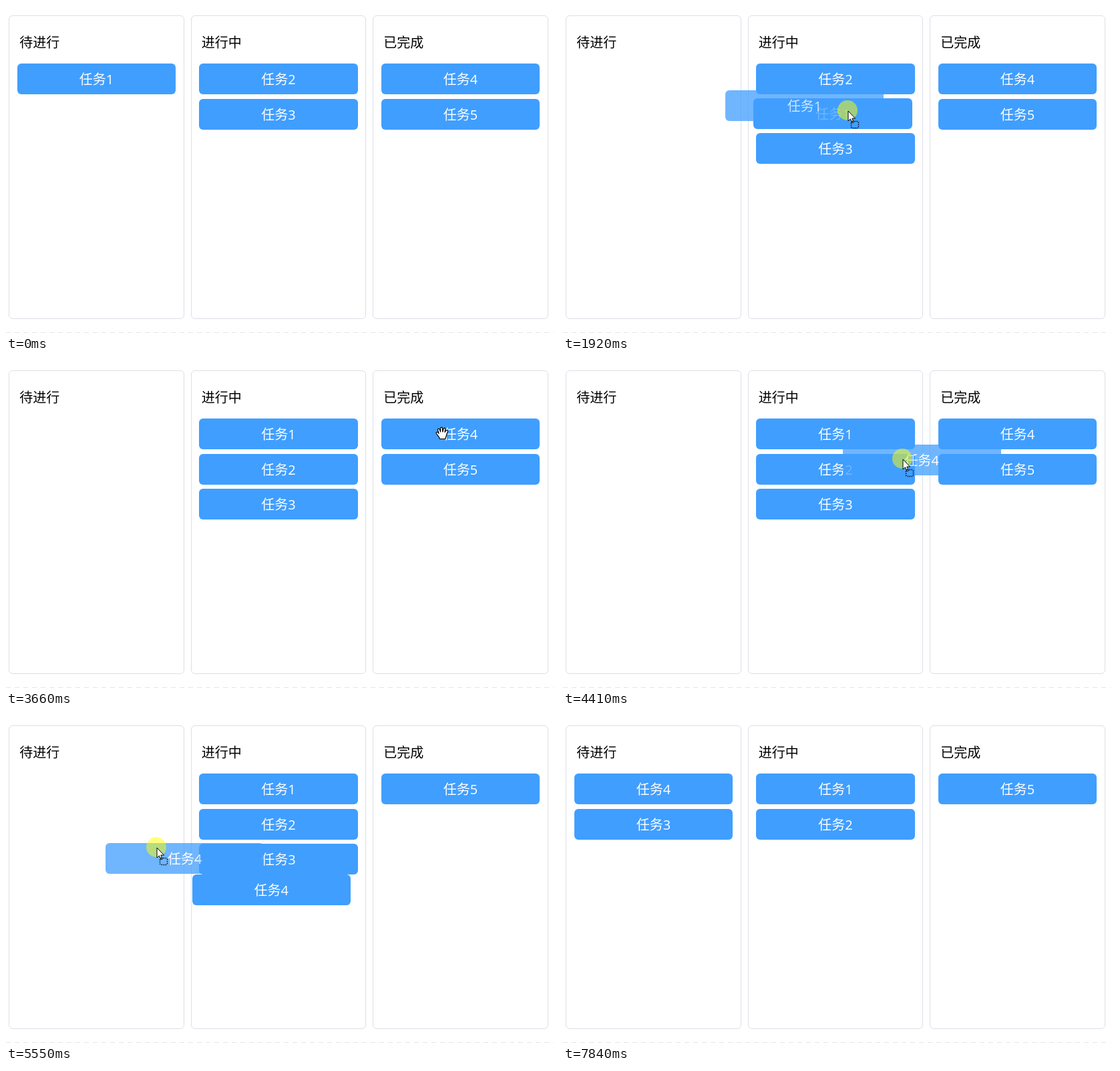
Recreate the animation shown at these times as an HTML page. Size 825 by 489 pixels, loop 8640 ms.

```html
<!DOCTYPE html>
<html lang="zh">
<head>
<meta charset="utf-8">
<style>
  html, body { margin: 0; width: 100%; height: 100%; overflow: hidden; background: #fff; }
  body { position: relative; font: 20px "Open Sans", "Noto Sans CJK SC", "Noto Sans CJK", sans-serif; }
  body > * { position: absolute; box-sizing: border-box; }
  .col { top: 14px; width: 262.5px; height: 454px; padding: 17px 15px; border: 1px solid #dcdfe6; border-radius: 6px; line-height: 46px; }
  .card { width: 237.3px; height: 46px; border-radius: 6px; background: #409eff; color: #fff; line-height: 48px; text-align: center; }
  #ghost { opacity: .75; }
  #rule { left: 0; top: 488px; width: 820px; height: 1px; background: repeating-linear-gradient(90deg, #e2e5e9 0 7px, #fff 7px 13px); }
  svg { left: 0; top: 0; overflow: visible; }
</style>
</head>
<body>
<div id="rule"></div>
<svg id="cursor" width="1" height="1" stroke="#000" fill="#fff" stroke-linejoin="round">
  <circle id="press" r="15" fill="#ff0" fill-opacity=".5" stroke="none"/>
  <path id="hand" stroke-width="1.2" d="M-3.5 8.5C-4 5-8.5 2-9-.5C-8.5-2.5-6-1.5-5 .5L-6.5-5C-6.5-7.5-4-7.5-3.5-5L-2.5-2V-7C-2-9.5 .5-9.5 .5-7L.8-2L2-6.5C3-8.8 5-8 4.7-6L4-1.5L6-4C7.5-5.5 9.3-4 8.3-2C6.5 1.5 6.5 5 4.5 8.5Z"/>
  <path id="arrow" d="M1 1V16l3.4-3.1 2.6 6 2.4-1-2.6-5.8h4.7z"/>
  <rect id="badge" x="5.5" y="16.5" width="11" height="10" rx="2" fill="none" stroke-width="1.4" stroke-dasharray="1.5 1.5"/>
</svg>
<script>
const LOOP = 8640, STEP = 70, SLIDE = 300;

// Pointer moves: start, end, then the points of a line or a quadratic curve
const moves = [
  [260, 1170, [562, 418], [198, 116]],
  [1570, 2060, [198, 116], [468, 163]],
  [2320, 2950, [468, 163], [445, 36], [431, 133]],
  [3170, 3660, [431, 133], [560, 80], [652.5, 107.5]],
  [4130, 4740, [652.5, 107.5], [410, 172]],
  [4740, 5550, [410, 172], [425, 400], [225, 196]],
  [5550, 6020, [225, 196], [160, 150], [190, 177]],
  [6350, 6630, [294, 208], [384, 211]],
  [6890, 7370, [384, 211], [179, 186]],
  [7700, 7840, [330, 296], [667, 555]],
];

// Button down, drag start, drop, task, ghost offset from the pointer
const drags = [
  [1370, 1570, 2060, 1, -183, -30],
  [2320, 2390, 2950, 1, -179, -24],
  [3930, 4130, 4800, 4, -89, -21],
  [4800, 4800, 5880, 4, -76, -6],
  [6630, 6890, 7370, 3, -95, -20],
];

// Time, task, new column, new row
const shifts = [[1694, 1, 1, 1], [2530, 1, 1, 0], [4430, 4, 1, 1], [4800, 4, 1, 2],
  [4920, 4, 1, 3], [5546, 4, 0, 0], [7060, 3, 0, 1]];

const boards = [{ at: 0, cols: [[1], [2, 3], [4, 5]] }];
for (const [at, task, col, row] of shifts) {
  const cols = boards.at(-1).cols.map(c => c.filter(n => n !== task));
  cols[col].splice(row, 0, task);
  boards.push({ at, cols });
}

const $ = id => document.getElementById(id);
const cursor = $('cursor');
const show = (el, on) => el.style.display = on ? '' : 'none';
const place = (el, [x, y]) => { el.style.left = x + 'px'; el.style.top = y + 'px'; };
const mix = (a, b, p) => a.map((v, i) => v + (b[i] - v) * p);
const easeOut = (p, power) => 1 - (1 - Math.min(1, p)) ** power;

function add(cls, text) {
  const el = document.createElement('div');
  el.className = cls;
  el.textContent = text;
  document.body.insertBefore(el, cursor);
  return el;
}

['待进行', '进行中', '已完成'].forEach((name, i) => { add('col', name).style.left = 4.2 + 272.5 * i + 'px'; });
const cards = [1, 2, 3, 4, 5].map(n => add('card', '任务' + n));
const ghost = add('card', '');
ghost.id = 'ghost';

const moveAt = t => moves.findLast(m => m[0] <= t) || moves[0];

// The picture advances in steps while the pointer moves
function stepped(t) {
  const [start, end] = moveAt(t);
  return t < start || t >= end ? t : t - (t - start) % STEP;
}

function pointer(t) {
  const [start, end, ...pts] = moveAt(t);
  const p = easeOut(Math.max(0, t - start) / (end - start), 1.48);
  const [a, b, c] = pts;
  return c ? mix(mix(a, b, p), mix(b, c, p), p) : mix(a, b, p);
}

function slot(task, { cols }) {
  const col = cols.findIndex(c => c.includes(task));
  return [16.9 + 272.5 * col, 86.2 + 52.4 * cols[col].indexOf(task)];
}

// Each change of the board slides the card on from where it was
function cardAt(task, t) {
  return boards.filter(b => b.at <= t).reduce(
    (pos, b) => mix(pos, slot(task, b), easeOut((t - b.at) / SLIDE, 3)),
    slot(task, boards[0]));
}

function draw(now) {
  const t = stepped(now % LOOP), [x, y] = pointer(t);
  const spots = cards.map((_, i) => cardAt(i + 1, t));
  cards.forEach((el, i) => place(el, spots[i]));
  const over = spots.some(([l, top]) => x >= l && x < l + 237 && y >= top && y < top + 46);

  const [, start, , task, dx, dy] = drags.find(d => t >= d[0] && t < d[2]) || [];
  const dragging = t >= start;
  show(ghost, dragging);
  if (dragging) {
    ghost.textContent = '任务' + task;
    place(ghost, [x + dx, y + dy]);
  }
  show(cursor, t >= 260 && t < 7840);
  place(cursor, [x, y]);
  show($('press'), task);
  show($('hand'), over && !dragging);
  show($('arrow'), !over || dragging);
  show($('badge'), dragging);
}

const begin = performance.now();
function tick() {
  draw(performance.now() - begin);
  requestAnimationFrame(tick);
}
tick();
</script>
</body>
</html>
```
